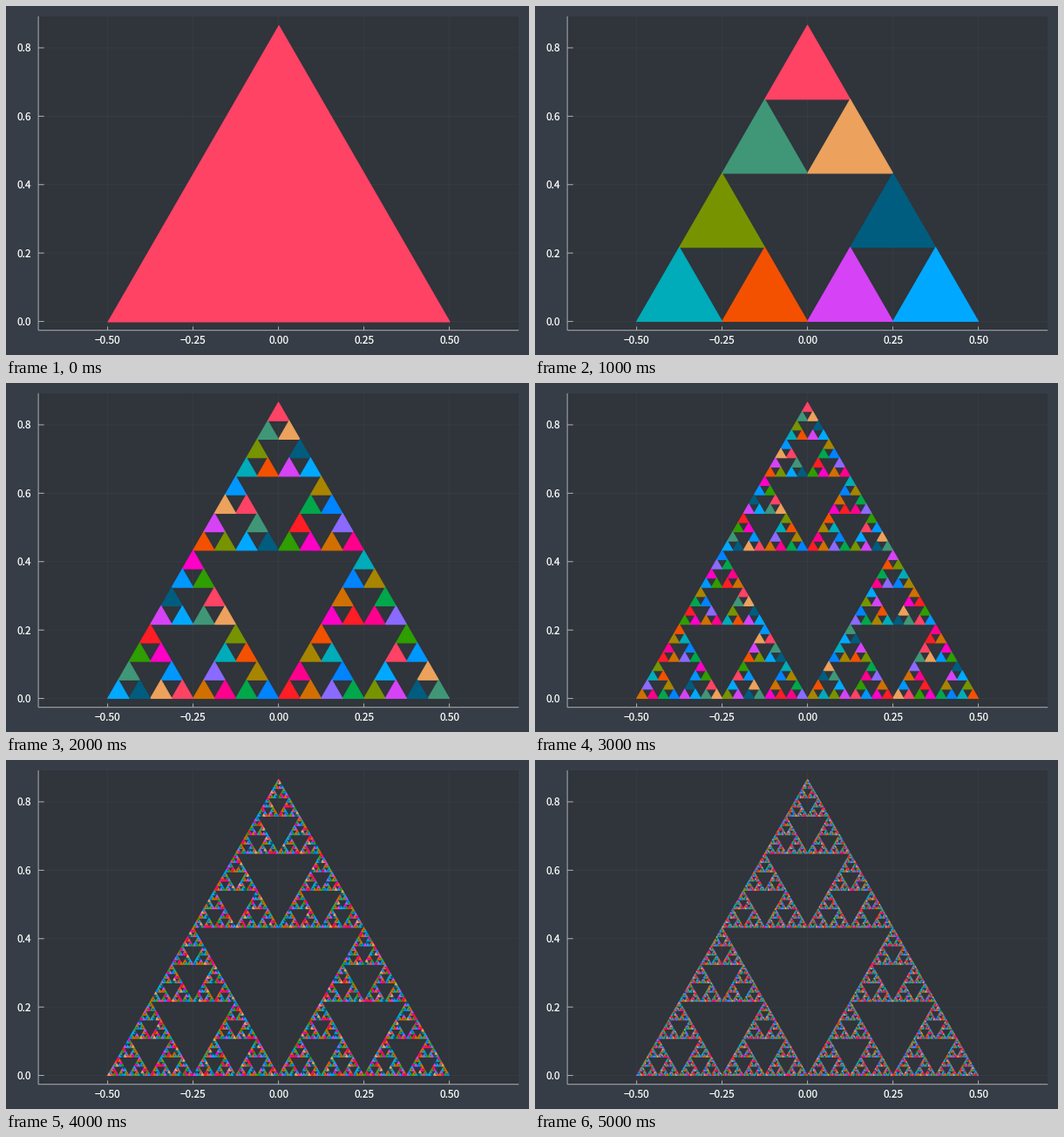
Write a matplotlib script that moves like this. It is 600 by 400 pixels and loops after 6 s.

```python
import math

import matplotlib.pyplot as plt
import numpy as np
from matplotlib.animation import FuncAnimation
from matplotlib.collections import PolyCollection
from matplotlib.colors import to_rgb

W, H, DPI = 600, 400, 100
PT = 72 / DPI  # points per pixel

BG, INSIDE, FG = "#363D46", "#30343B", "#ADB2B7"
LEFT, RIGHT, TOP, BOTTOM = 37.1, 588.2, 11.8, 371.7
X0, Y0, UNIT = 312.6, 361.55, 392

BASE = ["#FE4365", "#ECA25C", "#3F9778", "#005D7F"]
HUE_STEPS = [13, 18, 6, 3, 11, 5, 16, 9, 17, 0, 4, 2, 19, 7, 15]

plt.rcParams["font.family"] = "Noto Sans CJK JP"
plt.rcParams["text.hinting"] = "none"


def lch_to_rgb(light, chroma, hue):
    """CIE LCHab (D65) to clipped sRGB."""
    a = chroma * math.cos(math.radians(hue))
    b = chroma * math.sin(math.radians(hue))
    fy = (light + 16) / 116
    f = np.array([fy + a / 500, fy, fy - b / 200])
    xyz = np.where(f > 6 / 29, f**3, (f - 16 / 116) * 108 / 841)
    xyz = xyz * [0.95047, 1.0, 1.08883]
    to_linear = np.array([[3.2406, -1.5372, -0.4986],
                          [-0.9689, 1.8758, 0.0415],
                          [0.0557, -0.2040, 1.0570]])
    lin = np.clip(to_linear @ xyz, 0, 1)
    return np.where(lin <= 0.0031308, 12.92 * lin,
                    1.055 * lin ** (1 / 2.4) - 0.055)


PALETTE = np.array([to_rgb(c) for c in BASE]
                   + [lch_to_rgb(57, 100, k * 340 / 19) for k in HUE_STEPS])


def px(x):
    return X0 + UNIT * x


def py(y):
    return Y0 - UNIT * y


def sierpinski(depth):
    """Triangles in drawing order: top, right, left at every level."""
    height = math.sqrt(3) / 2
    tris = np.array([[[0, height], [0.5, 0], [-0.5, 0]]])
    for _ in range(depth):
        parts = [(tris + tris[:, i:i + 1]) / 2 for i in range(3)]
        tris = np.stack(parts, axis=1).reshape(-1, 3, 2)
    return np.stack([px(tris[..., 0]), py(tris[..., 1])], axis=-1)


fig = plt.figure(figsize=(W / DPI, H / DPI), dpi=DPI, facecolor=BG)
ax = fig.add_axes([0, 0, 1, 1])
ax.set_xlim(0, W)
ax.set_ylim(H, 0)
ax.axis("off")


def line(xs, ys, width=1.0, alpha=1.0, z=4):
    ax.plot(xs, ys, color=FG, lw=width * PT, alpha=alpha, zorder=z,
            solid_capstyle="butt", snap=False)


def label(x, y, text, ha):
    ax.text(x, y, text, color="white", fontsize=11.9 * PT, ha=ha,
            va="baseline", zorder=5)


ax.fill([LEFT, RIGHT, RIGHT, LEFT], [TOP, TOP, BOTTOM, BOTTOM],
        color=INSIDE, lw=0, zorder=0)

for v in np.arange(-2, 3) / 4:
    x = px(v)
    line([x, x], [TOP, BOTTOM], 0.5, 0.1, 1)
    line([x, x], [BOTTOM, BOTTOM - 4.3])
    label(x, 387, f"{v:.2f}".replace("-", "\u2212"), "center")

for v in np.arange(5) / 5:
    y = py(v)
    line([LEFT, RIGHT], [y, y], 0.5, 0.1, 1)
    line([LEFT, LEFT + 6.6], [y, y])
    label(29.4, y + 4.3, f"{v:.1f}", "right")

line([LEFT, LEFT], [TOP, BOTTOM])
line([LEFT, RIGHT], [BOTTOM, BOTTOM])

shapes = PolyCollection([], linewidths=PT, joinstyle="round", zorder=2)
ax.add_collection(shapes, autolim=False)


def update(i):
    tris = sierpinski(math.ceil(1.6 * i))
    shapes.set_verts(tris)
    shapes.set_color(PALETTE[np.arange(len(tris)) % len(PALETTE)])
    return [shapes]


anim = FuncAnimation(fig, update, frames=6, init_func=lambda: update(0),
                     interval=1000, repeat=True, repeat_delay=0)
plt.show()
```
